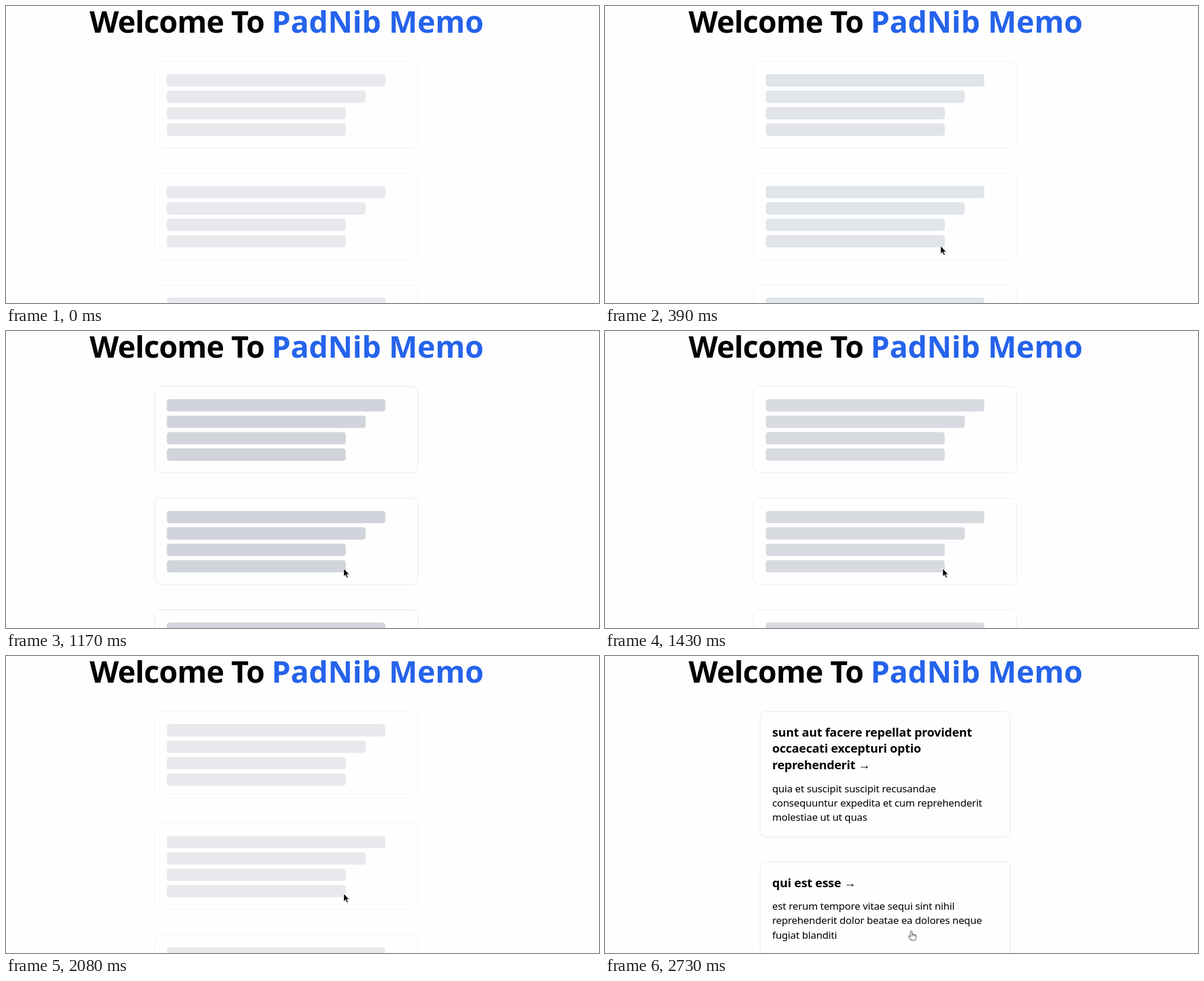
These frames come from a looping animation (1000x501 px, 3380 ms). An HTML page:

```html
<!DOCTYPE html>
<html lang="en">
<head>
<meta charset="utf-8">
<title>Loading skeleton</title>
<style>
  html, body { margin: 0; width: 100%; height: 100%; overflow: hidden; background: #fefefe; }
  svg { display: block; width: 100vw; height: 100vh; }
  text { font-family: "Noto Sans", "Open Sans", sans-serif; white-space: pre; }
  .head { font-size: 51px; font-weight: 700; letter-spacing: -.8px; }
  .brand { fill: #2563eb; letter-spacing: 0; }
  .title { font-size: 20.4px; font-weight: 700; letter-spacing: -.2px; }
  .body { font-size: 17px; letter-spacing: -.15px; }
  .arrow { font: 400 20px "Liberation Sans", sans-serif; }
  .card { fill: none; stroke: #e5e7eb; }
  .bar { fill: #d1d5db; }
  .cursor { stroke-linejoin: round; stroke-linecap: round; }
</style>
</head>
<body>
<svg id="stage" viewBox="0 0 1000 501">
  <text class="head" x="141" y="45">Welcome To</text>
  <text class="head brand" x="448" y="45">PadNib Memo</text>
  <g id="skeleton"></g>
  <g id="posts"></g>
  <g id="pointer" class="cursor">
    <path d="M1 1V14L4 11.3L6.2 16L8 15.2L6 10.7H10Z" fill="#000" opacity=".2"/>
    <path d="M0 0V13L3 10.3L5.2 15.2L7.4 14.2L5.2 9.6H9.2Z" fill="#0a0a0a" stroke="#fff" stroke-width=".7"/>
  </g>
  <g id="move" class="cursor" fill="none">
    <path d="M-6.5 0H6.5M0-6.5V6.5" stroke="#fff" stroke-width="4"/>
    <path d="M-6.5 0H6.5M0-6.5V6.5" stroke="#222" stroke-width="1.4"/>
    <path d="M-7.5 0l3-2.6v5.2zM7.5 0l-3-2.6v5.2zM0-7.5l-2.6 3h5.2zM0 7.5l-2.6-3h5.2z" fill="#222"/>
  </g>
  <g id="hand" class="cursor">
    <path d="M-3.4 2V-6.2Q-3.4-7.8-2-7.8T-.6-6.2V-2Q.4-3 1.6-1.7Q2.8-2.5 3.8-1.1Q6-1.7 6 .7V3.6Q6 6 4.4 8H-2.2Q-3.6 5.4-6 2.6Q-6.9 1.3-5.9.6T-3.4 2Z"
      fill="#fff" stroke="#555" stroke-width="1.1"/>
    <path d="M-.6-2V1M1.6-1.5V1M3.8-1V1" stroke="#666" stroke-width=".9" fill="none"/>
  </g>
</svg>
<script>
const LOOP = 3380, STEP = 130, LOADED = 2470;
const $ = id => document.getElementById(id);

function add(parent, tag, attrs, text = "") {
  const el = document.createElementNS("http://www.w3.org/2000/svg", tag);
  for (const key in attrs) el.setAttribute(key, attrs[key]);
  el.textContent = text;
  parent.appendChild(el);
  return el;
}

function card(parent, x, y, width, height) {
  add(parent, "rect", { class: "card", x, y, width, height, rx: 10.4 });
}

function skeletonCard(y) {
  card($("skeleton"), 250.5, y, 444, 146);
  [368.5, 335.5, 301.8, 301.8].forEach((width, i) =>
    add($("skeleton"), "rect", {
      class: "bar", x: 271.2, y: y + 21.5 + i * 27.7, width, height: 20.8, rx: 4.5
    }));
}

function post(y, height, title, body) {
  const g = $("posts");
  card(g, 261.5, y, 422, height);
  let base = y + 42.2;
  title.forEach((line, i) => {
    const last = i === title.length - 1;
    const el = add(g, "text", { class: "title", x: 282, y: base + i * 27.75 }, last ? line + " " : line);
    if (last) add(el, "tspan", { class: "arrow" }, "→");
  });
  base += (title.length - 1) * 27.75 + 38.4;
  body.forEach((line, i) =>
    add(g, "text", { class: "body", x: 282, y: base + i * 24.27 }, line));
}

for (let i = 0; i < 3; i++) skeletonCard(93.5 + i * 188.4);
post(93.5, 212,
  ["sunt aut facere repellat provident", "occaecati excepturi optio", "reprehenderit"],
  ["quia et suscipit suscipit recusandae", "consequuntur expedita et cum reprehenderit", "molestiae ut ut quas"]);
post(347.5, 156.5,
  ["qui est esse"],
  ["est rerum tempore vitae sequi sint nihil", "reprehenderit dolor beatae ea dolores neque", "fugiat blanditi"]);

// cubic-bezier(.4, 0, .6, 1)
function ease(x) {
  let lo = 0, hi = 1;
  for (let i = 0; i < 24; i++) {
    const s = (lo + hi) / 2, r = 1 - s;
    if (1.2 * r * r * s + 1.8 * r * s * s + s * s * s < x) lo = s; else hi = s;
  }
  return lo * lo * (3 - 2 * lo);
}

// Two-second pulse between half and full opacity
function pulse(t) {
  const p = ((t - 50 + 2000) % 2000) / 1000;
  return .5 + .5 * ease(p < 1 ? p : 2 - p);
}

function show(id, on) { $(id).style.display = on ? "" : "none"; }

function place(id, on, x, y) {
  show(id, on);
  $(id).setAttribute("transform", `translate(${x} ${y})`);
}

function draw(t) {
  const loaded = t >= LOADED;
  show("skeleton", !loaded);
  show("posts", loaded);
  $("skeleton").setAttribute("opacity", pulse(t));

  const glide = Math.min(1, Math.max(0, (t - 390) / 260));
  place("pointer", t >= 260 && !loaded, 566 + 3.5 * glide, 405 - 4 * glide);
  place("move", t === LOADED, 532.5, 448.5);
  const settle = Math.min(1, (t - LOADED) / 260);
  place("hand", t > LOADED, 532 - 13.5 * settle, 449 + 22.5 * settle);
}

const start = performance.now();
function tick() {
  const t = (performance.now() - start) % LOOP;
  draw(Math.floor(t / STEP) * STEP);
  requestAnimationFrame(tick);
}
tick();
</script>
</body>
</html>
```
